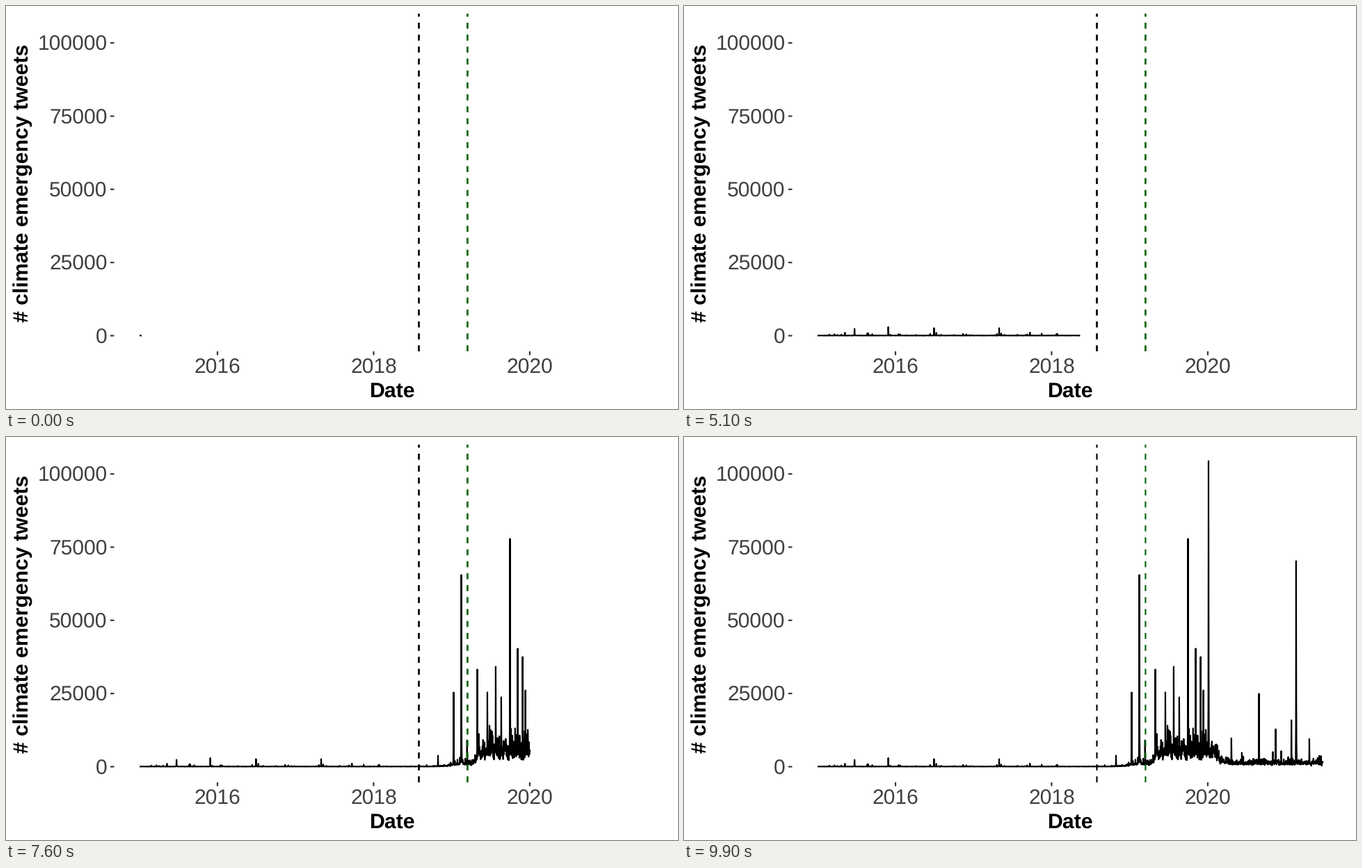
Animation, 966 px wide and 580 px high, one loop 10000 ms. Source, as a matplotlib script:

```python
import numpy as np
import matplotlib.pyplot as plt
from matplotlib.animation import FuncAnimation

W, H, DPI = 966, 580, 100
PT = 72 / DPI                 # points per pixel
FRAMES, INTERVAL = 100, 100
X0, DAY, DAYS = 192.0, 0.3071, 2367
Y0, STEP_Y = 474.5, 105.33    # zero line, pixels per 25000
TOP, BOTTOM = 11, 497
STROKE, BOLD = 2.13, 2.7

plt.rcParams.update({
    "font.family": "Liberation Sans",
    "text.hinting": "none",
    "lines.scale_dashes": False,
})

# The tallest days: (x, height in pixels)
PEAKS = [(245, 10), (293.5, 12.5), (359.5, 11), (453, 11), (621, 16),
         (643.5, 107), (654.5, 276), (662.7, 38), (677.6, 140), (692, 107),
         (704, 144), (712, 100), (724.6, 328), (735.5, 170), (742.5, 158),
         (746.5, 110), (754, 440), (787, 41), (826.5, 105), (850.5, 54),
         (873, 67), (880, 296), (899, 40)]


def bump(x, start, end, rise, fall):
    """Smooth plateau between start and end."""
    return 0.5 * (np.tanh((x - start) / rise) - np.tanh((x - end) / fall))


def make_series():
    rng = np.random.default_rng(7)
    day = np.arange(DAYS)
    x = X0 + DAY * day
    level = (0.25 + 5 * bump(x, 642, 1000, 16, 16)
             + 18 * bump(x, 677, 766, 3, 9))
    height = level * np.exp(rng.normal(0, 0.38, DAYS))
    # Minor bursts grow with the general level
    burst = rng.random(DAYS) < 0.04
    height += burst * rng.exponential(1.2 + 0.8 * level)
    for px, peak in PEAKS:
        gap = day - round((px - X0) / DAY)
        decay = np.where(gap < 0, 1.6, 1.15)
        height = np.maximum(height, peak * np.exp(-decay * np.abs(gap)))
    return x, Y0 - height


fig = plt.figure(figsize=(W / DPI, H / DPI), dpi=DPI, facecolor="white")
ax = fig.add_axes([0, 0, 1, 1])
ax.set(xlim=(0, W), ylim=(H, 0))
ax.axis("off")


def stroke(x, y, color, **kw):
    return ax.plot(x, y, color=color, lw=STROKE * PT, snap=False,
                   solid_capstyle="butt", dash_capstyle="butt",
                   solid_joinstyle="round", **kw)[0]


def label(x, y, s, color="#404040", size=30, **kw):
    kw = {"ha": "center", "va": "baseline", **kw}
    ax.text(x, y, s, color=color, fontsize=size * PT, **kw)


def title(x, y, s, **kw):
    label(x, y, s, "black", 30.3, weight="bold", **kw)


for i in range(5):
    y = Y0 - i * STEP_Y
    stroke([150, 155.5], [y, y], "#333333")
    label(145.5, y + 11, str(25000 * i), ha="right")
for i, year in enumerate((2016, 2018, 2020)):
    x = 304 + 224.45 * i
    stroke([x, x], [BOTTOM, BOTTOM + 5.5], "#333333")
    label(x, 529, str(year))
title(555.5, 563, "Date")
title(33, 255, "# climate emergency tweets",
      rotation=90, rotation_mode="anchor")

xs, ys = make_series()
curve = stroke([], [], "black")
dash = (0, (8.6 * PT, 8.6 * PT))
markers = [stroke([x, x], [BOTTOM, TOP], color, ls=dash, zorder=3)
           for x, color in ((593.5, "black"), (663.4, "#006400"))]


def draw(i):
    last = i == FRAMES - 1
    end = xs[-1] if last else min(194.9 + 7.345 * i, xs[-1])
    n = np.searchsorted(xs, end)
    curve.set_data(np.append(xs[:n], end),
                   np.append(ys[:n], np.interp(end, xs, ys)))
    for m in markers:
        m.set_linewidth((STROKE if last else BOLD) * PT)
    return [curve, *markers]


anim = FuncAnimation(fig, draw, frames=FRAMES, interval=INTERVAL,
                     repeat=True, repeat_delay=0)
plt.show()
```
